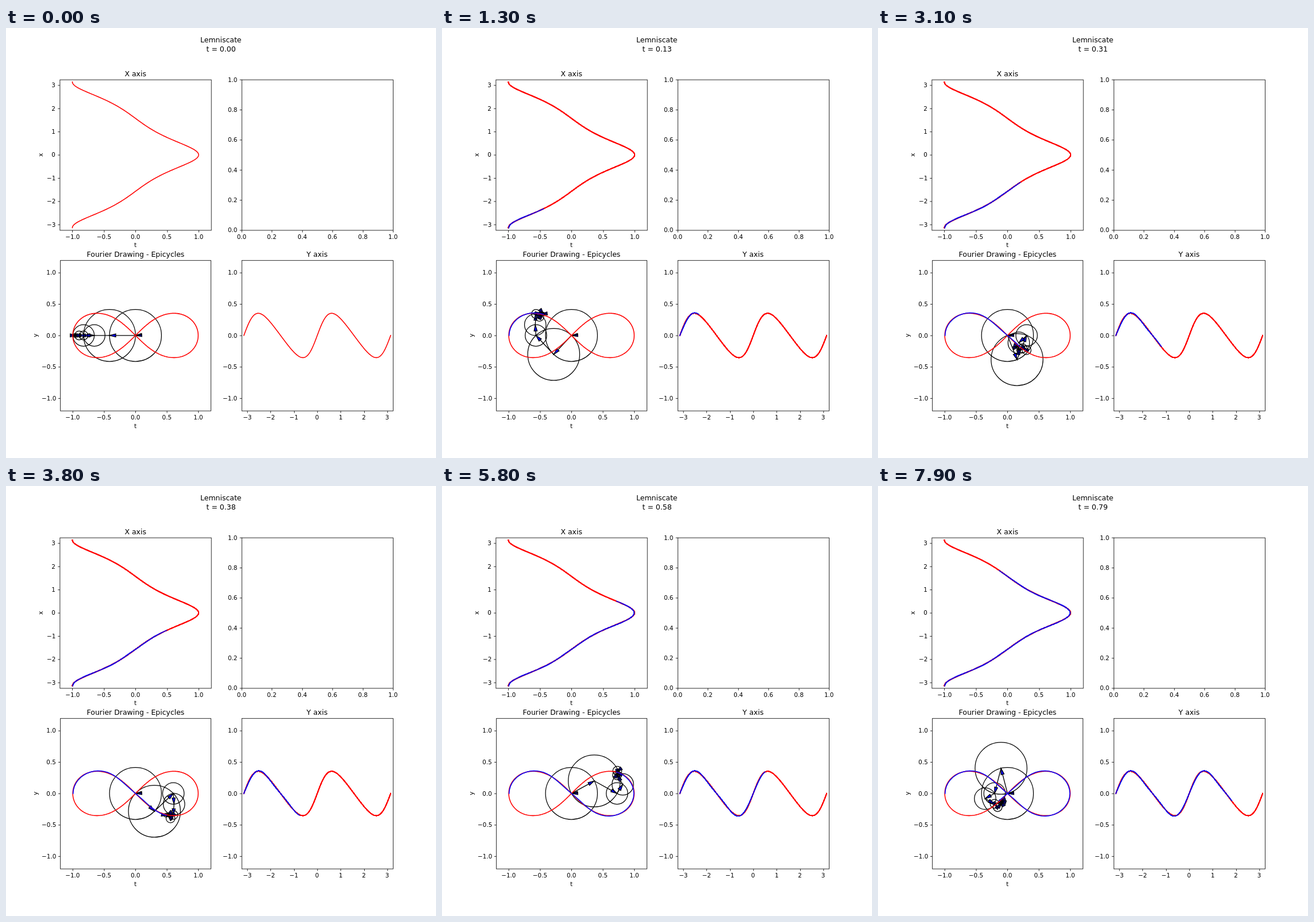
An HTML page with a canvas that plays this animation: 748x748 px, repeating every 8000 ms.

```html
<!DOCTYPE html>
<html lang="en">
<head>
<meta charset="utf-8">
<title>Lemniscate epicycles</title>
<style>
html, body { margin: 0; width: 748px; height: 748px; overflow: hidden; background: #fff; }
canvas { display: block; width: 748px; height: 748px; }
</style>
</head>
<body>
<canvas id="stage" width="748" height="748"></canvas>
<script>
const STAGE = 748, FIGURE = 1000;   // the figure is laid out in 1000 units
const POINT = 100 / 72;             // one typographic point in figure units
const STEP = 100, STEPS = 80, CYCLE = 100;
const ORDER = 5;                    // highest harmonic, used in both directions
const OVERDRAW = 10;                // side plots are painted over themselves up to this often
const R = Math.SQRT2 - 1;           // radius ratio of successive harmonics
const TITLE = 12 * POINT, LABEL = 10 * POINT;
const { PI, cos, sin, round } = Math;
const ctx = document.getElementById('stage').getContext('2d');
ctx.scale(STAGE / FIGURE, STAGE / FIGURE);

// A plot area with linear scales; xr and yr are [min, max].
function makeAxes(left, top, right, bottom, xr, yr) {
  return {
    left, top, right, bottom,
    px: x => left + (x - xr[0]) / (xr[1] - xr[0]) * (right - left),
    py: y => bottom - (y - yr[0]) / (yr[1] - yr[0]) * (bottom - top),
  };
}

const unit = [-1.2, 1.2], turn = [-PI - 0.1, PI + 0.1];
const xPlot = makeAxes(125, 120, 477.27, 470, unit, turn);
const blank = makeAxes(547.73, 120, 900, 470, [0, 1], [0, 1]);
const cycles = makeAxes(126.14, 540, 476.14, 890, unit, unit);
const yPlot = makeAxes(547.73, 540, 900, 890, turn, unit);
const SCALE = cycles.px(1) - cycles.px(0);

const halves = [-1, -0.5, 0, 0.5, 1];
const whole = [-3, -2, -1, 0, 1, 2, 3];
const fifths = [0, 0.2, 0.4, 0.6, 0.8, 1];

const angleAt = k => 2 * PI * k / CYCLE - PI;

function lemniscate(t) {
  const d = 1 + sin(t) ** 2;
  return [cos(t) / d, sin(t) * cos(t) / d];
}

// Vectors in drawing order: constant, +1, -1, +2, -2, ...
function vectors(k) {
  const list = [{ r: 1e-9, a: PI + 0.08 }];
  for (let n = 1; n <= ORDER; n++) {
    const w = 2 * PI * n * k / CYCLE;
    list.push({ r: R ** n, a: w + (n % 2 ? PI : 0) }, { r: R ** n, a: PI - w });
  }
  return list;
}

function partialSum(k) {
  return vectors(k).reduce(([x, y], v) => [x + v.r * cos(v.a), y + v.r * sin(v.a)], [0, 0]);
}

const exact = Array.from({ length: 401 }, (_, i) => {
  const t = -PI + 2 * PI * i / 400;
  return [t, ...lemniscate(t)];
});
const traced = Array.from({ length: STEPS }, (_, k) => [angleAt(k), ...partialSum(k)]);

const snap = v => Math.floor(v + 0.5) + 0.5;

function text(str, x, y, size, align = 0.5) {
  ctx.font = size + 'px "DejaVu Sans", sans-serif';
  ctx.fillStyle = '#000';
  ctx.fillText(str, round(x - ctx.measureText(str).width * align), round(y));
}

function sideText(str, x, y) {
  ctx.save();
  ctx.translate(x, y);
  ctx.rotate(-PI / 2);
  text(str, 0, 0, LABEL);
  ctx.restore();
}

function pen(color, width, cap = 'butt', join = 'miter') {
  ctx.strokeStyle = color;
  ctx.lineWidth = width;
  ctx.lineCap = cap;
  ctx.lineJoin = join;
}

function segment(x1, y1, x2, y2) {
  ctx.beginPath();
  ctx.moveTo(x1, y1);
  ctx.lineTo(x2, y2);
  ctx.stroke();
}

function frame(ax, xTicks, yTicks, xDigits, yDigits) {
  const l = snap(ax.left), r = snap(ax.right), t = snap(ax.top), b = snap(ax.bottom);
  const label = (v, digits) => v.toFixed(digits).replace('-', '\u2212');
  const tick = 3.5 * POINT;
  pen('#000', 0.8 * POINT);
  ctx.strokeRect(l, t, r - l, b - t);
  for (const v of xTicks) {
    const x = snap(ax.px(v));
    segment(x, b, x, b + tick);
    text(label(v, xDigits), ax.px(v), ax.bottom + 21, LABEL);
  }
  for (const v of yTicks) {
    const y = snap(ax.py(v));
    segment(l - tick, y, l, y);
    text(label(v, yDigits), ax.left - 2 * tick, ax.py(v) + 5, LABEL, 1);
  }
}

// Strokes points [t, x, y], choosing the two columns to plot.
function curve(ax, points, count, col, row, color) {
  if (count < 2) return;
  pen(color, 1.5 * POINT, 'square', 'round');
  ctx.beginPath();
  for (let i = 0; i < count; i++) ctx.lineTo(ax.px(points[i][col]), ax.py(points[i][row]));
  ctx.stroke();
}

function pair(ax, k, col, row) {
  curve(ax, exact, exact.length, col, row, '#f00');
  curve(ax, traced, k + 1, col, row, '#00f');
}

// Arrow of the given length whose tip lies at its end; short ones keep a full head.
function arrow(x, y, v) {
  const len = v.r * SCALE, head = 0.1 * SCALE, half = 0.025 * SCALE, shaft = 0.0005 * SCALE;
  ctx.save();
  ctx.translate(x, y);
  ctx.rotate(-v.a);
  ctx.translate(len, 0);
  ctx.beginPath();
  ctx.moveTo(0, 0);
  ctx.lineTo(-head, -half);
  ctx.lineTo(-head, -shaft);
  ctx.lineTo(-len, -shaft);
  ctx.lineTo(-len, shaft);
  ctx.lineTo(-head, shaft);
  ctx.lineTo(-head, half);
  ctx.closePath();
  ctx.fillStyle = '#00f';
  ctx.fill();
  ctx.stroke();
  ctx.restore();
}

function epicycles(k) {
  let x = cycles.px(0), y = cycles.py(0);
  pen('#000', 1.2 * POINT);
  for (const v of vectors(k)) {
    const r = v.r * SCALE;
    if (r > 0.01) {
      ctx.beginPath();
      ctx.arc(x, y, r, 0, 2 * PI);
      ctx.stroke();
    }
    arrow(x, y, v);
    x += r * cos(v.a);
    y -= r * sin(v.a);
  }
}

function draw(k) {
  ctx.fillStyle = '#fff';
  ctx.fillRect(0, 0, FIGURE, FIGURE);

  epicycles(k);
  pair(cycles, k, 1, 2);
  for (let i = Math.max(0, k - OVERDRAW + 1); i <= k; i++) {
    pair(xPlot, i, 1, 0);
    pair(yPlot, i, 0, 2);
  }

  frame(xPlot, halves, whole, 1, 0);
  frame(blank, fifths, fifths, 1, 1);
  frame(cycles, halves, halves, 1, 1);
  frame(yPlot, whole, halves, 0, 1);

  const mid = cycles.px(0);
  text('Lemniscate', 500, 34, TITLE);
  text('t = ' + (k / CYCLE).toFixed(2), 500, 55, TITLE);
  text('X axis', mid, 112, TITLE);
  text('Fourier Drawing - Epicycles', mid, 532, TITLE);
  text('Y axis', yPlot.px(0), 532, TITLE);
  text('t', mid, 510, LABEL);
  text('t', mid, 930, LABEL);
  sideText('x', 86, xPlot.py(0));
  sideText('y', 74, cycles.py(0));
}

const start = performance.now();
let shown = -1;

function tick() {
  const k = Math.floor((performance.now() - start) / STEP) % STEPS;
  if (k !== shown) draw(shown = k);
  requestAnimationFrame(tick);
}
tick();
</script>
</body>
</html>
```
